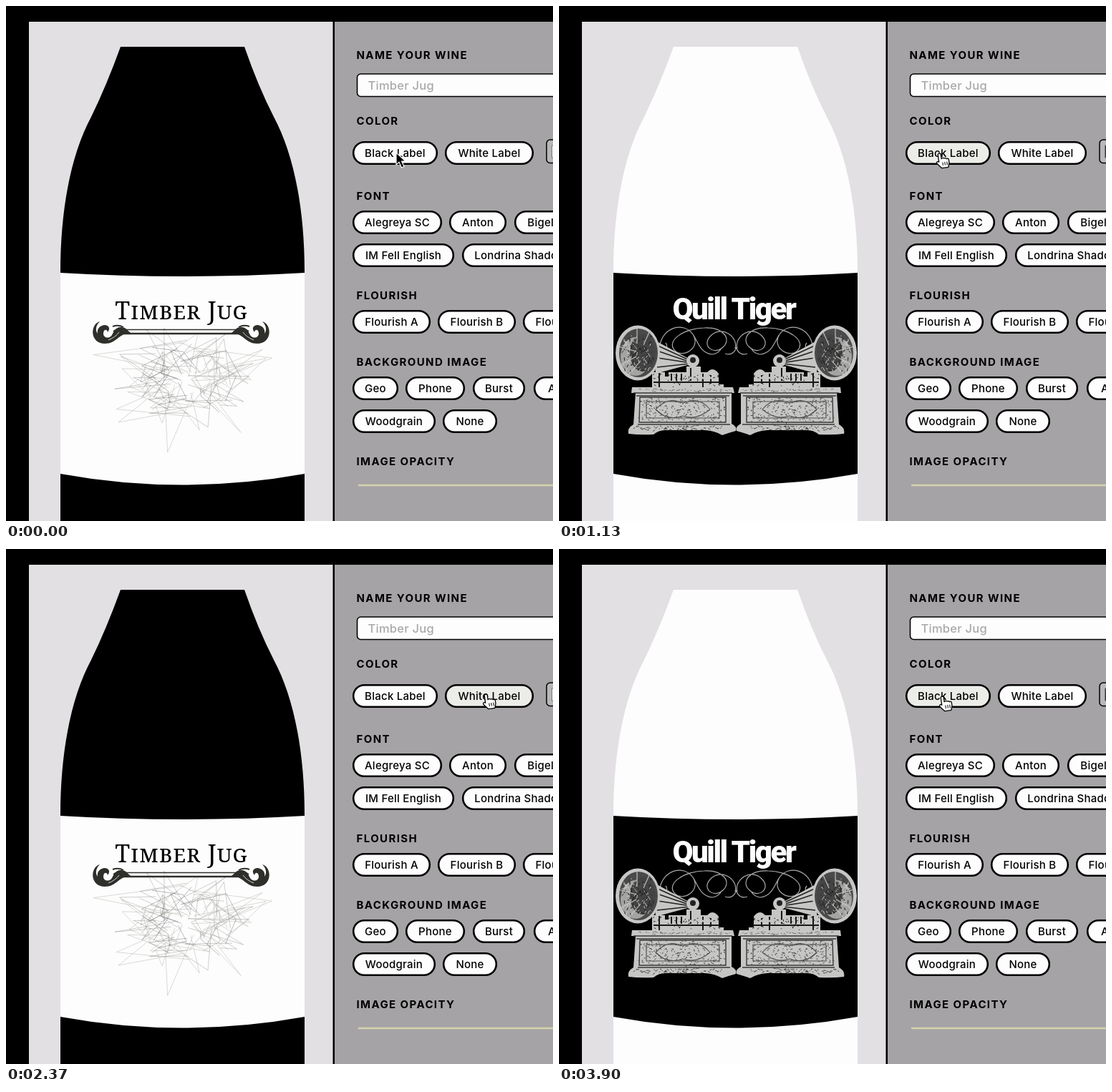
An HTML page that plays this animation: 764x720 px, repeating every 3.93 s.

```html
<!DOCTYPE html>
<html lang="en">
<head>
<meta charset="utf-8">
<title>Wine label designer</title>
<style>
html, body { margin: 0; width: 100%; height: 100%; overflow: hidden; background: #000; }
svg { display: block; }
text { font: 550 15px Inter, "Open Sans", sans-serif; letter-spacing: .25px; }
.head { font-weight: 700; letter-spacing: 1.4px; }
.hint { font-size: 16.5px; fill: #aaa9a9; }
.pill rect { fill: #fdfdfd; stroke: #000; stroke-width: 2.6; }
.pill.on rect { fill: #ecede8; }
.serif { font: 400 34px "Noto Serif", serif; font-variant: small-caps; letter-spacing: .8px; text-anchor: middle; }
.poster { font: 900 42px Roboto, sans-serif; letter-spacing: -2.4px; text-anchor: middle; fill: #fdfdfd; }
.line { fill: none; }
</style>
</head>
<body>
<svg id="stage" width="764" height="720" viewBox="0 0 764 720"></svg>
<script>
const WHITE = '#fdfdfd', WALL = '#e2e0e3', PANEL = '#a5a3a5', SILVER = '#c6c6c4', INK = '#2e2e2a';
const LOOP = 3930;

let seed = 11;
const rnd = () => (seed = seed * 16807 % 2147483647) / 2147483647;
const span = (a, b) => a + (b - a) * rnd();
const stroke = (d, color, width = 1, extra = '') =>
  `<path class="line" d="${d}" stroke="${color}" stroke-width="${width}" ${extra}/>`;
const mirror = (art, sum) => art + `<g transform="matrix(-1 0 0 1 ${sum} 0)">${art}</g>`;

// Short engraving marks scattered over a box
function hatch(n, x, y, w, h, dx, dy) {
  let d = '';
  while (n--) {
    d += `M${span(x, x + w).toFixed(1)} ${span(y, y + h).toFixed(1)}l${span(-dx, dx).toFixed(1)} ${span(0, dy).toFixed(1)}`;
  }
  return d;
}

// Shards fanning out from the core, each with a far tip
function web(n, reach) {
  const point = (a, r) => `${(252 + Math.cos(a) * r * 116).toFixed(1)} ${(522 + Math.sin(a) * r * 93).toFixed(1)}`;
  let d = '';
  while (n--) {
    const a = span(0, 2 * Math.PI);
    d += `M${point(a + span(-1.2, 1.2), span(.05, .55))}L${point(a, span(.25, reach))}L${point(a + span(-1.2, 1.2), span(.05, .7))}`;
  }
  return d;
}

function bottle(glass, label, art) {
  return `<path fill="${glass}" d="M160 57Q140 112 119 155C92 205 76 280 76 372V720H417V372C417 280 401 205 374 155Q352 112 333 57Z"/>
    <path fill="${label}" d="M76 373Q246 383 417 373V654Q246 685 76 654Z"/>${art}`;
}

function scrollwork() {
  const curl = `<path fill="${INK}" d="M131 441C117 445 117 472 138 472C155 472 156 458 174 457L166 450C153 446 151 455 148 460C144 466 136 464 136 458C136 452 141 451 142 456C148 449 140 444 134 447C129 449 127 453 128 458C124 453 126 446 131 441Z"/>`
    + stroke('M149 448Q157 445 164 449M150 455Q157 450 166 452', INK, 2)
    + stroke('M143 467Q153 463 158 456', WHITE, .8);
  return mirror(curl, 489) + stroke('M166 452.5H324', INK, 1.3) + stroke('M162 458H327', INK, 2.6);
}

function phonograph() {
  const horn = `<path fill="${SILVER}" d="M131 466L183 494V501L135 514Z"/>`
    + stroke('M136 474L184 496M137 482L184 498M138 492L184 499M137 505L183 500', '#222', 1.6)
    + `<ellipse cx="110" cy="485" rx="31" ry="38.5" fill="${SILVER}"/>
       <ellipse cx="111" cy="485" rx="27" ry="34" fill="#4a4a4a"/>
       <ellipse cx="107" cy="490" rx="21" ry="27" fill="#a4a4a2"/>
       <ellipse cx="117" cy="485" rx="18" ry="26" fill="#444"/>`
    + stroke(hatch(80, 89, 460, 42, 50, 3, 5), '#222', 1)
    + stroke(hatch(60, 86, 460, 42, 52, 3, 5), SILVER, 1)
    + stroke('M109 447V472M83 476L108 483M84 503L108 490M97 516L114 496M126 456L118 474', SILVER, 1.1);
  const works = `<circle cx="187" cy="496" r="9" fill="${SILVER}"/><circle cx="187" cy="495" r="4" fill="#222"/>
    <path fill="${SILVER}" d="M130 512H148V518H153V512H178V504H198V512H207Q215 503 223 514V529H230V535H130Z"/>`
    + stroke('M132 526H224M140 513V534M157 514V524M164 514V524M171 514V524M184 506V524M201 514V534M212 516V528', '#191919', 2)
    + stroke('M178 520H222', SILVER, 3)
    + stroke(hatch(40, 132, 512, 92, 20, 3, 3), '#222', 1);
  const box = `<path fill="${SILVER}" d="M102 533H243L245 541H241V584Q249 588 247 594Q236 597 228 600Q218 594 204 593H151Q140 592 132 599Q112 600 97 598Q95 590 104 585L107 541H101Z"/>`
    + stroke('M104 541H242M108 545H238M110 585H239M113 547L112 582H233V547Z', '#383838', 1.4)
    + stroke('M122 553H224V576H122ZM135 564Q151 545 173 555Q196 545 211 564Q192 580 173 573Q151 581 135 564Z', '#555', 1.2)
    + stroke(hatch(230, 112, 546, 122, 36, 3, 2), '#444', 1)
    + stroke(hatch(75, 105, 586, 125, 7, 4, 2), '#3a3a3a', .9)
    + stroke(hatch(55, 108, 535, 130, 4, 4, 1), '#666', .8);
  return mirror(horn + works + box, 495);
}

const ribbon = stroke(
  'M141 474C145 450 173 440 187 459C199 478 173 493 162 482C148 467 177 450 203 450C231 449 241 466 229 477C216 489 199 475 211 462C226 445 251 462 246 479'
  + 'M141 474C144 485 155 478 149 471M187 459C193 467 197 486 214 487Q222 486 226 480M232 486Q243 490 248 477', '#aaa9a6', 1.2);

const geometric = bottle('#000', WHITE,
  stroke(web(32, 1.2), '#c9c9c3', .7)
  + stroke(web(30, .9), '#8c8c8a', .6, 'opacity=".7"')
  + stroke(web(14, .7), '#444', .6, 'opacity=".6"')
  + scrollwork() + '<text class="serif" x="245" y="438">Timber Jug</text>');
const musical = bottle(WHITE, '#000',
  mirror(ribbon, 495) + phonograph() + '<text class="poster" x="244" y="438">Quill Tiger</text>');

const heads = [
  ['NAME YOUR WINE', 73.5], ['COLOR', 165.5], ['FONT', 271], ['FLOURISH', 410],
  ['BACKGROUND IMAGE', 503], ['IMAGE OPACITY', 642]
].map(([s, y]) => `<text class="head" x="489.5" y="${y}">${s}</text>`).join('');

const pills = [
  ['Black Label', 484, 603, 189], ['White Label', 613, 737, 189],
  ['Alegreya SC', 484, 609, 286], ['Anton', 619, 699, 286], ['Bigelow Rules', 710, 850, 286],
  ['IM Fell English', 484, 626, 332], ['Londrina Shadow', 637, 800, 332],
  ['Flourish A', 484, 593, 425], ['Flourish B', 603, 712, 425], ['Flourish C', 722, 832, 425],
  ['Geo', 484, 548, 518], ['Phone', 558, 641, 518], ['Burst', 652, 725, 518], ['Abstract', 737, 840, 518],
  ['Woodgrain', 484, 600, 564], ['None', 610, 686, 564]
].map(([s, x, right, y]) => `<g class="pill"><rect x="${x + 1.2}" y="${y + 1.2}" width="${right - x - 2.4}" height="30.6" rx="15.3"/>
  <text x="${(x + right) / 2}" y="${y + 22}" text-anchor="middle">${s}</text></g>`).join('');

const stage = document.getElementById('stage');
stage.innerHTML = `<rect width="764" height="720"/>
  <rect x="32" y="22" width="424.5" height="698" fill="${WALL}"/>
  <rect x="459" y="22" width="305" height="698" fill="${PANEL}"/>
  <g id="dark">${geometric}</g><g id="light">${musical}</g>
  ${heads}
  <rect x="490.5" y="95" width="300" height="31.5" rx="5" fill="${WHITE}" stroke="#000" stroke-width="1.6"/>
  <text class="hint" x="505.5" y="117">Timber Jug</text>
  <rect x="755" y="187" width="60" height="32.5" rx="5" fill="#b9b8b9" stroke="#000" stroke-width="1.5"/>
  <rect id="swatch" x="762.5" y="195" width="40" height="17" stroke="#777"/>
  ${pills}
  <path d="M492 670H764" stroke="#d6d3ae" stroke-width="2.4"/>
  <g id="cursor">
    <path id="arrow" d="M0 0V17L4 13.3L7.5 21L11 19.5L7.6 12H13Z" stroke="${WHITE}" stroke-width="1.2"/>
    <g id="hand" stroke="#000" stroke-width="1.3" stroke-linejoin="round" transform="rotate(-8)">
      <path fill="${WHITE}" d="M-2 1Q0-1 2 1V8Q4 6 6 8Q8 7 9 9Q12 8 12 11V15L10 21H1L-5 14Q-6 11 -3 11L-2 12Z"/>
      <path d="M3 13V17.5M6 13V17.5M9 13V17.5" stroke-width="1"/>
    </g>
  </g>`;

const $ = id => document.getElementById(id);
const show = (el, on) => el.setAttribute('visibility', on ? 'visible' : 'hidden');
const [blackPill, whitePill] = stage.querySelectorAll('.pill');

// Pointer stops: time, x, y
const stops = [
  [0, 545, 205], [30, 545, 205], [400, 531, 206], [1200, 531, 206],
  [1700, 670, 203], [2450, 670, 203], [2950, 535, 206], [LOOP, 535, 206]
];

function pointer(t) {
  const i = stops.findIndex(s => s[0] > t);
  const [t0, x0, y0] = stops[i - 1], [t1, x1, y1] = stops[i];
  const u = (t - t0) / (t1 - t0), k = u * u * (3 - 2 * u);
  return [x0 + (x1 - x0) * k, y0 + (y1 - y0) * k];
}

function draw(now) {
  const t = now % LOOP, [x, y] = pointer(t);
  const onBlack = t >= 60 && x < 603, onWhite = x > 613;
  const light = t >= 900 && t < 2050 || t >= 3600;
  show($('light'), light);
  show($('dark'), !light);
  $('swatch').setAttribute('fill', light ? '#333' : WHITE);
  blackPill.classList.toggle('on', onBlack);
  whitePill.classList.toggle('on', onWhite);
  show($('hand'), onBlack || onWhite);
  show($('arrow'), !onBlack && !onWhite);
  $('cursor').setAttribute('transform', `translate(${x.toFixed(1)} ${y.toFixed(1)})`);
}

const start = performance.now();
function tick() {
  draw(performance.now() - start);
  requestAnimationFrame(tick);
}
tick();
</script>
</body>
</html>
```
